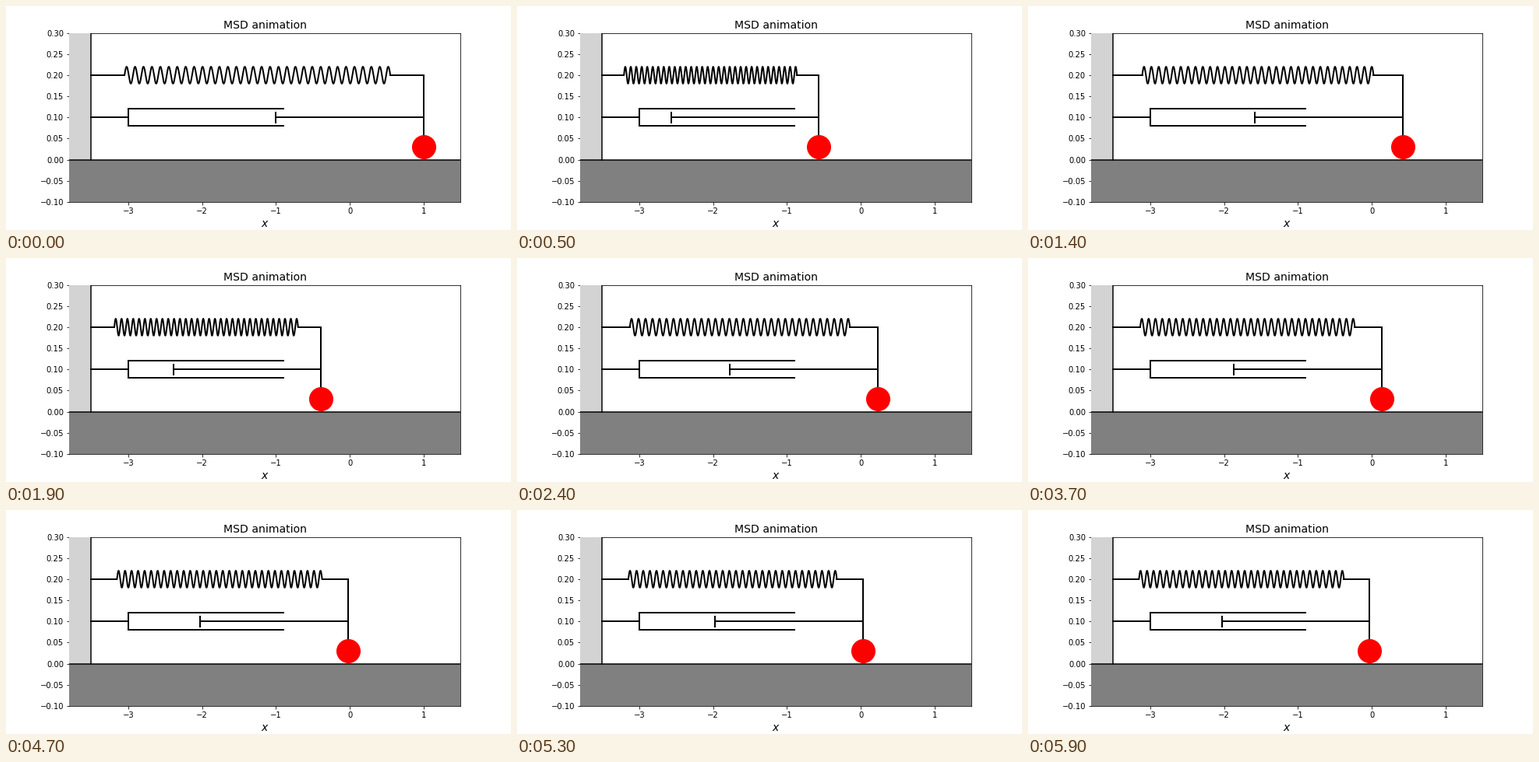
Recreate the animation shown at these times as a matplotlib script. Size 648x288 px, loop 6000 ms.

```python
import numpy as np
import matplotlib.pyplot as plt
from matplotlib.animation import FuncAnimation

FRAMES, INTERVAL = 60, 100

# Mass-spring-damper released from x = 1 at rest
DECAY = 0.5
OMEGA = np.sqrt(25 - DECAY ** 2)

WALL = -3.5
CYLINDER = -3.0
CYLINDER_END = -0.9
ROD = 2.0
SPRING_Y, DAMPER_Y, BALL_Y = 0.2, 0.1, 0.03
COILS = 31.5

plt.rcParams["font.family"] = "DejaVu Sans"
fig, ax = plt.subplots(figsize=(9, 4), dpi=72)
fig.subplots_adjust(left=0.125, right=0.9, bottom=0.125, top=0.88)
ax.set_xlim(-3.8, 1.5)
ax.set_ylim(-0.1, 0.3)
ax.set_title("MSD animation", fontsize=14)
ax.set_xlabel("$x$", fontsize=14)


def block(x0, x1, y0, y1, color):
    ax.fill([x0, x1, x1, x0], [y0, y0, y1, y1], color=color, lw=0, zorder=3)


def line(xs=(), ys=(), lw=2):
    return ax.plot(xs, ys, color="black", lw=lw, zorder=4)[0]


block(-3.8, 1.5, -0.1, 0, "gray")
block(-3.8, WALL, 0, 0.3, "lightgray")
line([-3.8, 1.5], [0, 0], 1.5)
line([WALL, WALL], [0, 0.3], 1.5)

# Damper housing
line([WALL, CYLINDER], [DAMPER_Y, DAMPER_Y])
line([CYLINDER, CYLINDER], [0.08, 0.12])
for y in (0.08, 0.12):
    line([CYLINDER, CYLINDER_END], [y, y])

spring, lead, tail, post, rod, piston = (line() for _ in range(6))
ball, = ax.plot([], [], "o", color="red", ms=30, zorder=5)

s = np.linspace(0, 1, 1500)
coil_y = SPRING_Y + 0.02 * np.sin(2 * np.pi * COILS * s)


def position(t):
    swing = np.cos(OMEGA * t) + DECAY / OMEGA * np.sin(OMEGA * t)
    return np.exp(-DECAY * t) * swing


def update(i):
    x = position(i * INTERVAL / 1000)
    length = x - WALL
    start, end = WALL + 0.1 * length, WALL + 0.9 * length
    spring.set_data(start + (end - start) * s, coil_y)
    lead.set_data([WALL, start], [SPRING_Y, SPRING_Y])
    tail.set_data([end, x], [SPRING_Y, SPRING_Y])
    post.set_data([x, x], [BALL_Y, SPRING_Y])
    rod.set_data([x - ROD, x], [DAMPER_Y, DAMPER_Y])
    piston.set_data([x - ROD, x - ROD], [DAMPER_Y - 0.012, DAMPER_Y + 0.012])
    ball.set_data([x], [BALL_Y])
    return spring, lead, tail, post, rod, piston, ball


anim = FuncAnimation(fig, update, frames=FRAMES, interval=INTERVAL,
                     repeat=True, repeat_delay=0)
plt.show()
```
